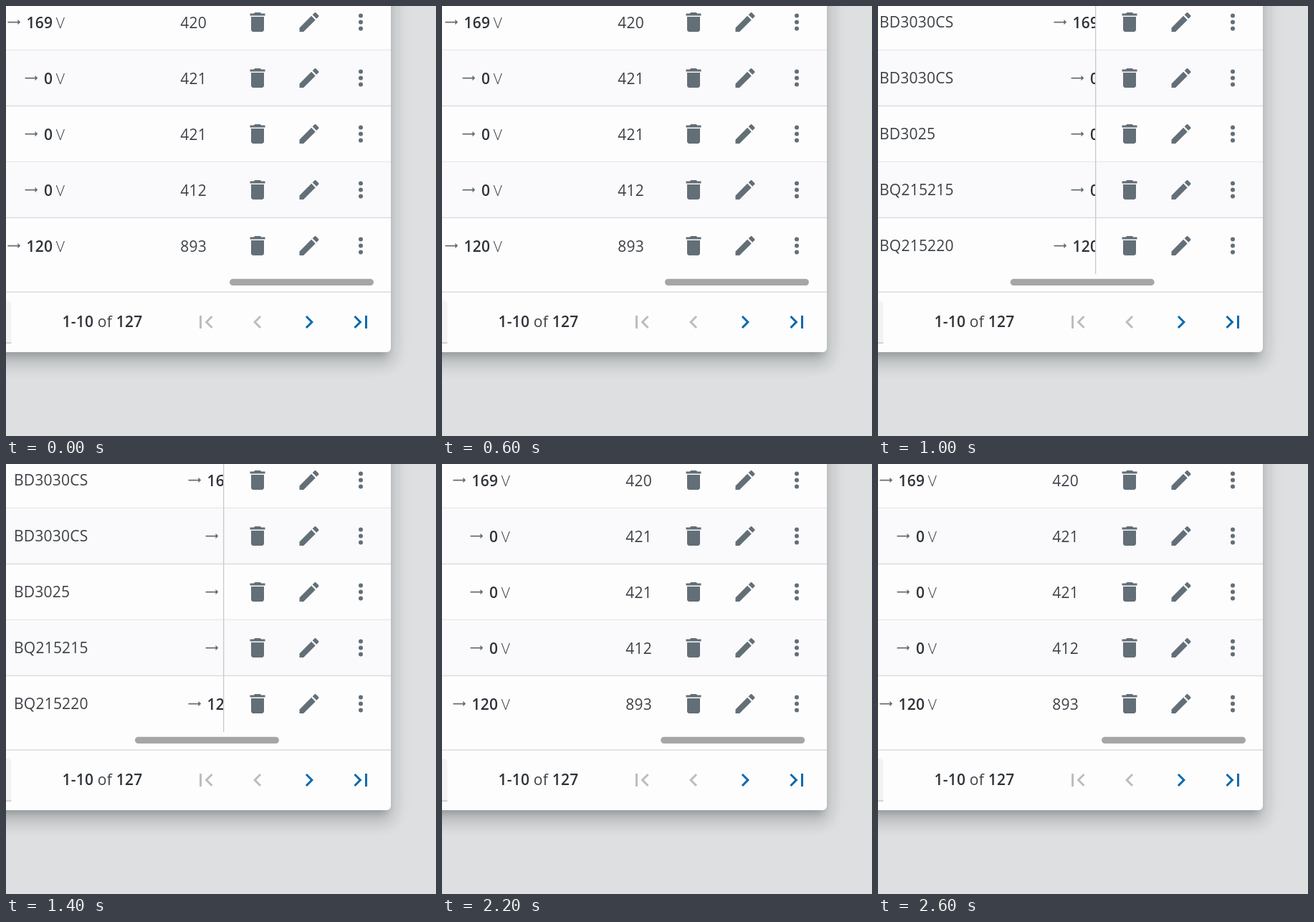
These frames come from a looping animation (600 px wide and 600 px high, 2900 ms). An HTML page:

```html
<!DOCTYPE html>
<html lang="en">
<head>
<meta charset="utf-8">
<title>Table scroll</title>
<style>
  @property --shift { syntax: "<length>"; inherits: true; initial-value: 0px; }
  @property --line { syntax: "<number>"; inherits: true; initial-value: 0; }
  html, body { margin: 0; width: 100%; height: 100%; overflow: hidden; background: #dddfe0; }
  .card {
    position: absolute; left: -100px; top: -100px; width: 637px; height: 583px;
    border-radius: 6px; background: #fefdfe;
    box-shadow: 0 10px 10px -6px rgba(30, 36, 42, .22),
                0 16px 20px 2px rgba(30, 36, 42, .14),
                0 6px 28px 4px rgba(30, 36, 42, .1);
  }
  svg {
    position: absolute; left: 0; top: 0; width: 600px; height: 600px;
    animation: scroll 2900ms step-end infinite;
  }
  text { font: 400 21px "Open Sans", sans-serif; letter-spacing: .225px; fill: #3c4247; }
  .bold { font-weight: 600; fill: #2d3338; }
  .unit { font-weight: 300; }
  .end { text-anchor: end; }
  .stripe { fill: #faf9fb; }
  .rule { fill: #dcdcdf; }
  .icon { fill: #636f77; }
  .off { fill: #bbbec0; }
  .on { fill: #0a6aad; }
  .content { transform: translateX(var(--shift)); }
  .thumb { fill: #a6a6a6; transform: translateX(calc(var(--shift) * -.524)); }
  .divider { fill: #c9c9cc; opacity: var(--line); }

  /* the picture advances in 100 ms steps */
  @keyframes scroll {
    0%      { --shift: 0px; --line: 0; }
    20.689% { --shift: 2px; --line: 0; }
    24.137% { --shift: 36px; --line: 1; }
    27.586% { --shift: 130px; --line: 1; }
    31.034% { --shift: 212px; --line: 1; }
    34.482% { --shift: 243px; --line: 1; }
    37.931% { --shift: 251.5px; --line: 1; }
    41.379% { --shift: 252px; --line: 1; }
    68.965% { --shift: 201px; --line: 1; }
    72.413% { --shift: 75px; --line: 1; }
    75.862% { --shift: 13px; --line: 0; }
    79.310% { --shift: 3px; --line: 0; }
    82.758% { --shift: 1px; --line: 0; }
    86.206%, 100% { --shift: 0px; --line: 0; }
  }
</style>
</head>
<body>
<div class="card"></div>
<svg viewBox="0 0 600 600">
  <defs>
    <clipPath id="pane"><rect width="303.5" height="380"/></clipPath>
    <path id="arrow" d="M22 12l-4-4v3.1H3v1.8h15V16z"/>
    <g id="actions" class="icon">
      <path transform="translate(333 4.5) scale(1.5)" d="M6 19c0 1.1.9 2 2 2h8c1.1 0 2-.9 2-2V7H6v12zM19 4h-3.5l-1-1h-5l-1 1H5v2h14V4z"/>
      <path transform="translate(405 4.5) scale(1.5)" d="M3 17.25V21h3.75L17.81 9.94l-3.75-3.75L3 17.25zM20.71 7.04c.39-.39.39-1.02 0-1.41l-2.34-2.34c-.39-.39-1.02-.39-1.41 0l-1.83 1.83 3.75 3.75 1.83-1.83z"/>
      <circle cx="495" cy="13.5" r="3"/>
      <circle cx="495" cy="22.5" r="3"/>
      <circle cx="495" cy="31.5" r="3"/>
    </g>
  </defs>

  <g id="back"></g>
  <g clip-path="url(#pane)"><g id="cells" class="content"></g></g>
  <g id="fixed"></g>
  <rect class="divider" x="303" width="1.3" height="374"/>
  <rect class="thumb" x="312" y="380.7" width="201" height="9.4" rx="4.7"/>

  <rect class="rule" y="398.3" width="537" height="1.5"/>
  <path fill="#f3f3f4" d="M0 411h2q5.5 0 5.5 6v53H0z"/>
  <rect fill="#bfc0c2" y="469.5" width="7.5" height="1.3"/>
  <text x="78.5" y="448.3"><tspan class="bold">1-10</tspan> of <tspan class="bold">127</tspan></text>
  <path class="off" transform="translate(261 423) scale(1.5)" d="M18.41 16.59L13.82 12l4.59-4.59L17 6l-6 6 6 6zM6 6h2v12H6z"/>
  <path class="off" transform="translate(333 423) scale(1.5)" d="M15.41 7.41L14 6l-6 6 6 6 1.41-1.41L10.83 12z"/>
  <path class="on" transform="translate(405 423) scale(1.5)" d="M10 6L8.59 7.41 13.17 12l-4.58 4.59L10 18l6-6z"/>
  <path class="on" transform="translate(477 423) scale(1.5)" d="M5.59 7.41L10.18 12l-4.59 4.59L7 18l6-6-6-6zM16 6h2v12h-2z"/>
</svg>
<script>
  const rows = [
    ["BD3030CS", "169", "420"],
    ["BD3030CS", "0", "421"],
    ["BD3025", "0", "421"],
    ["BQ215215", "0", "412"],
    ["BQ215220", "120", "893"],
  ];
  const add = (id, markup) =>
    document.getElementById(id).insertAdjacentHTML("beforeend", markup);

  rows.forEach(([part, volts, count], i) => {
    const y = i * 78;
    const arrowX = volts.length > 1 ? -0.3 : 23.8;
    if (i % 2) add("back", `<rect class="stripe" y="${y - 16.5}" width="537" height="78"/>`);
    if (i < 4) add("back", `<rect class="rule" y="${y + 60.7}" width="537" height="1.5"/>`);
    add("cells", `
      <text x="-241" y="${y + 30}">${part}</text>
      <use href="#arrow" class="icon" transform="translate(${arrowX} ${y + 11.4}) scale(.93)"/>
      <text class="bold end" x="65.2" y="${y + 30.5}">${volts}</text>
      <text class="unit" x="69.8" y="${y + 30.5}">V</text>
      <text class="end" x="280" y="${y + 30.5}">${count}</text>`);
    add("fixed", `<use href="#actions" y="${y}"/>`);
  });
</script>
</body>
</html>
```
